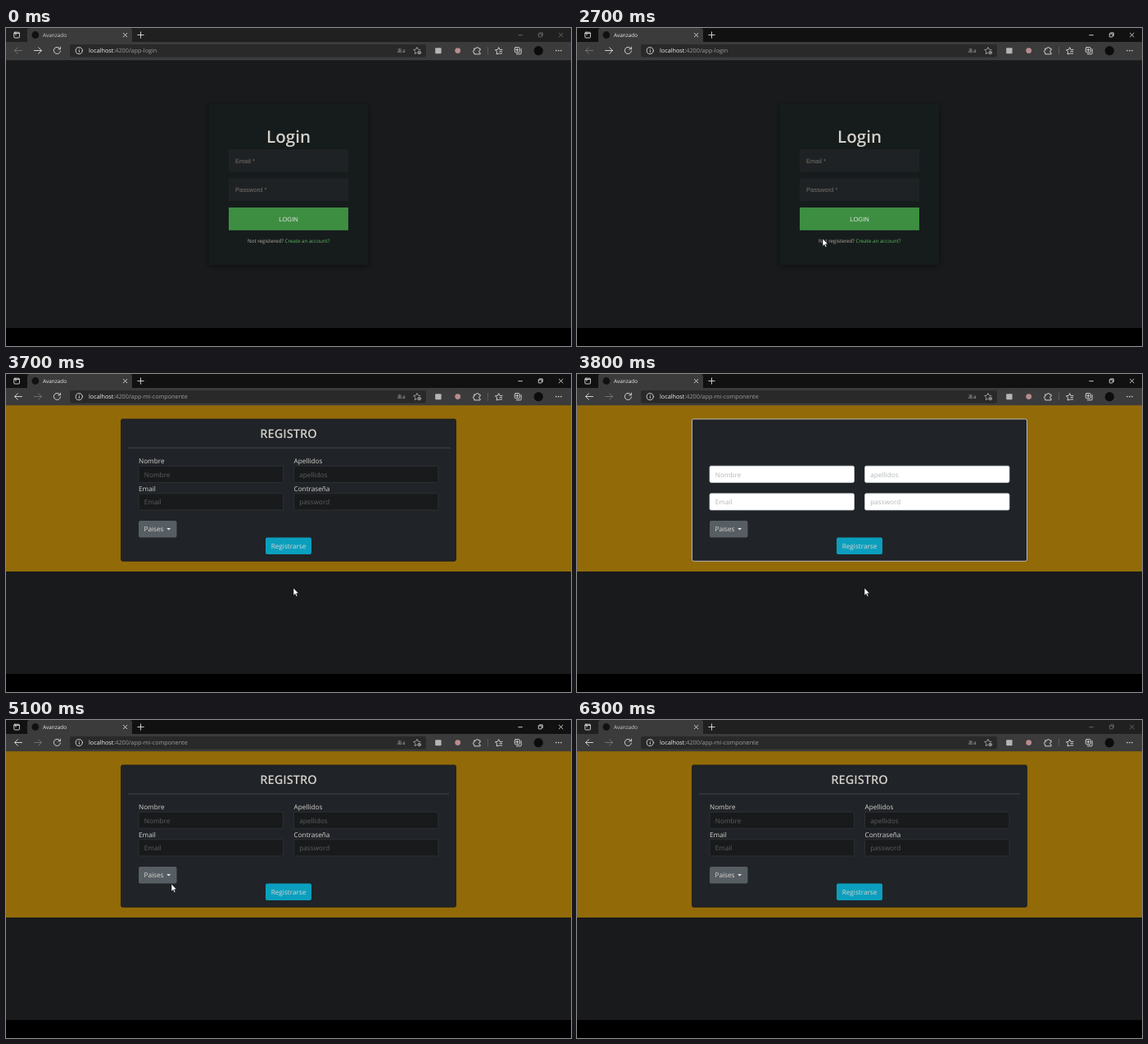
Animation of 690 by 388 pixels, one loop 7.2 s. Source, as an HTML page:

```html
<!DOCTYPE html>
<html lang="es">
<head>
<meta charset="utf-8">
<title>Login y registro</title>
<style>
  html, body { margin: 0; width: 100%; height: 100%; overflow: hidden; background: #000; }
  svg { display: block; width: 100vw; height: 100vh; }
  text { font-family: "Open Sans", "Noto Sans", sans-serif; text-rendering: geometricPrecision; }
  .arial { font-family: "Liberation Sans", Arial, sans-serif; font-size: 7.58px; }
  .mid { text-anchor: middle; }
  .body { font-size: 8.2px; fill: #d8d5d0; }
  .small { font-size: 6.2px; }
  .icon { fill: none; stroke: #dedede; stroke-width: .9; stroke-linecap: round; stroke-linejoin: round; }
  .heading { font-weight: 600; fill: #d3cfc9; }
  .hint { font-size: 8.2px; fill: #5c6062; }
  .field { fill: #181a1b; stroke: #34393c; stroke-width: .7; }
  .light .field { fill: #fff; stroke: #ced4da; }
  .light .hint { fill: #b4b7ba; }
  .light .dark-only { display: none; }
  .light .card { stroke: #d5d6d7; }
  .card { fill: #202327; stroke: #1a1c1e; stroke-width: .8; }
  #frame { fill: #111; }
  .inactive #frame { fill: #202020; }
  .inactive #windowButtons { opacity: .4; }
  .inactive #tabTitle { fill: #cfcfcf; }
  #tabTitle { fill: #eee; }
</style>
</head>
<body>
<svg id="stage" viewBox="0 0 690 388">
  <defs>
    <filter id="shadow" x="-20%" y="-20%" width="140%" height="140%">
      <feDropShadow dx="0" dy="1.5" stdDeviation="3" flood-color="#000" flood-opacity=".5"/>
    </filter>
  </defs>
  <rect width="690" height="388" fill="#181a1b"/>

  <g id="login">
    <rect y="38" width="690" height="1.2" fill="#404244"/>
    <rect x="247.5" y="93" width="195" height="196" fill="#181a1b" filter="url(#shadow)"/>
    <text class="heading mid" x="345" y="139.8" font-size="20.6">Login</text>
    <g fill="#1f2224">
      <rect x="272" y="148" width="146" height="27.7"/>
      <rect x="272" y="183.5" width="146" height="27.7"/>
    </g>
    <rect x="272" y="219" width="146" height="27.8" fill="#3d8e41"/>
    <g class="arial" fill="#77736c">
      <text class="arial" x="280" y="164.6">Email *</text>
      <text class="arial" x="280" y="200.1">Password *</text>
    </g>
    <text class="arial mid" x="345" y="235.7" fill="#e8e6e3">LOGIN</text>
    <text class="small" x="295" y="262" fill="#b3ada4">Not registered? <tspan fill="#5dbb61">Create an account?</tspan></text>
  </g>

  <g id="register">
    <rect y="38" width="690" height="203" fill="#926a08"/>
    <rect class="card" x="140.5" y="55" width="409" height="173.3" rx="2"/>
    <g class="dark-only">
      <text class="heading mid" x="345" y="78.2" font-size="14.6">REGISTRO</text>
      <rect id="rule" x="149" y="89.7" width="392" height=".8" fill="#4b4f52"/>
    </g>
    <g id="fields"></g>
    <rect x="162" y="179" width="46.5" height="20.4" rx="2" fill="#575e63"/>
    <text class="body" x="168.5" y="192.3">Paises</text>
    <path d="M196.2 187.9h5l-2.5 2.6z" fill="#e8e6e3"/>
    <rect x="317" y="199.6" width="56" height="20.4" rx="2" fill="#0b9fbe"/>
    <text class="body mid" x="345" y="212.9">Registrarse</text>
  </g>

  <g id="browser">
    <rect id="frame" width="690" height="18"/>
    <path d="M26 18V3q0-3 3-3H151q3 0 3 3V18z" fill="#3b3b3b"/>
    <rect y="17" width="690" height="21.2" fill="#3b3b3b"/>
    <rect x="78" y="20" width="435" height="15.6" rx="2" fill="#292929"/>
    <circle cx="35.8" cy="8.5" r="4.4" fill="#111"/>
    <text id="tabTitle" x="45" y="10.8" font-size="6.4">Avanzado</text>
    <g class="icon">
      <rect x="9.8" y="5.2" width="6.6" height="6.8" rx="1"/><path d="M9.8 6.5h6.6M12 6.5v2"/>
      <path d="M143.4 6.4l4.4 4.4m0-4.4l-4.4 4.4M164.5 4.8v7.4m-3.7-3.7h7.4"/>
      <path id="back" d="M19.5 27.5H10.6m3.8-3.8l-3.8 3.8 3.8 3.8"/>
      <path id="forward" d="M34.5 27.5h8.9m-3.8-3.8l3.8 3.8-3.8 3.8"/>
      <path d="M66 25.4a4.1 4.1 0 1 0 .5 2.6M66.4 23.2v2.6h-2.6"/>
      <circle cx="89.3" cy="27.6" r="4.1"/><path d="M89.3 27.2v2.3m0-4.2v.1"/>
      <g id="windowButtons">
        <path d="M625.8 8.7h4.6M675.4 6.2l4.6 4.6m0-4.6l-4.6 4.6"/>
        <rect x="650.3" y="7" width="3.9" height="3.9" rx=".5"/><path d="M651.7 5.9h3.6v3.6"/>
      </g>
      <path d="M571.8 25h2.3a1.5 1.5 0 0 1 3 0h2v2.2a1.5 1.5 0 0 0 0 3v1.7h-7.3v-2a1.4 1.4 0 0 1 0-2.8z"/>
      <path d="M602 31.2l-2.9.7.5-3-2.1-2.1 2.9-.4 1.3-2.7 1.3 2.7h3M602.9 28.6h2.8M602.9 31h2.8"/>
      <rect x="621.3" y="23.7" width="6" height="6" rx="1"/>
      <path d="M629.2 25.6v5.2q0 1-1 1h-4.8M624.3 25.2v3m-1.5-1.5h3"/>
    </g>
    <g class="icon" style="stroke:#a5a5a5">
      <path d="M506 26.5l-2.6-.4-1.4-2.7-1.4 2.7-2.9.4 2.1 2.1-.5 3 2.2-1.1"/>
      <circle cx="504.7" cy="30" r="1.9"/><path d="M504.7 29v2m-1-1h2"/>
    </g>
    <text x="477.6" y="30" font-size="6.4" fill="#a5a5a5" style="font-family:'Noto Sans CJK JP','Noto Sans CJK',sans-serif">あa</text>
    <rect x="524.2" y="24.2" width="7.4" height="7" rx="1" fill="#b5b5b5"/>
    <circle cx="551.7" cy="27.6" r="3.4" fill="#b98c8e"/>
    <rect x="588.2" y="23" width=".7" height="9.5" fill="#666"/>
    <circle cx="650.3" cy="27.7" r="5.6" fill="#0c0c0c"/>
    <g fill="#dedede"><circle cx="671.9" cy="27.6" r=".8"/><circle cx="674.9" cy="27.6" r=".8"/><circle cx="677.9" cy="27.6" r=".8"/></g>
    <text x="101" y="30.2" font-size="7.25" fill="#f0f0f0">localhost<tspan id="path" fill="#9c9c9c"></tspan></text>
  </g>

  <path id="cursor" d="M0 0V9.2L2.1 7.3 3.5 10.5 5 9.8 3.6 6.7H6.4Z" fill="#fff" stroke="#000" stroke-width=".5"/>
  <rect y="366" width="690" height="22" fill="#000"/>
</svg>
<script>
const LOOP = 7200;
const el = id => document.getElementById(id);

const fields = [
  [162, 112.2, 'Nombre', 'Nombre'],
  [351.5, 112.2, 'Apellidos', 'apellidos'],
  [162, 145.8, 'Email', 'Email'],
  [351.5, 145.8, 'Contraseña', 'password'],
];
el('fields').innerHTML = fields.map(([x, y, label, hint]) => `
  <text class="body dark-only" x="${x}" y="${y - 3.1}">${label}</text>
  <rect class="field" x="${x}" y="${y}" width="176.5" height="20.2" rx="1.8"/>
  <text class="hint" x="${x + 6.8}" y="${y + 13.3}">${hint}</text>`).join('');

// Pointer positions, each held until the next: time, x, y
const pointer = [
  [1800, 26, 113], [1900, 75, 188], [2000, 148, 238], [2100, 220, 256], [2200, 257, 253],
  [2400, 264, 254], [2500, 276, 255], [2600, 288, 256], [2700, 300, 257],
  [2800, 312, 258], [2900, 323, 259], [3000, 331, 260], [3100, 338, 261],
  [3200, 345, 261], [3300, 351, 261],
  [4200, 282, 274], [4300, 143, 248], [4400, 172, 211], [4500, 233, 256],
  [5100, 202, 200], [5200, 242, 232], [5300, 326, 290], [5400, 418, 334],
  [5500, 468, 350], [5600, 484, 354], [5900, 484, 359],
];
const POINTER_GONE = 6000;

function draw(t) {
  const within = (from, to) => t >= from && t < to;
  const registering = t >= 3700;
  el('login').style.display = registering ? 'none' : '';
  el('register').style.display = registering ? '' : 'none';
  el('register').classList.toggle('light', within(3800, 5100));
  el('rule').setAttribute('width', t < 3800 ? 394 : 392);
  el('stage').classList.toggle('inactive', !within(1800, 6300));
  el('path').textContent = ':4200/' + (t < 3500 ? 'app-login' : 'app-mi-componente');
  el('back').style.opacity = t < 3600 ? .35 : 1;
  el('forward').style.opacity = t < 3600 ? 1 : .35;

  const spot = pointer.findLast(([at]) => at <= t);
  const visible = spot && t < POINTER_GONE;
  el('cursor').style.display = visible ? '' : 'none';
  if (visible) el('cursor').setAttribute('transform', `translate(${spot[1]} ${spot[2]})`);
}

const start = performance.now();
function tick() {
  draw((performance.now() - start) % LOOP);
  requestAnimationFrame(tick);
}
tick();
</script>
</body>
</html>
```
